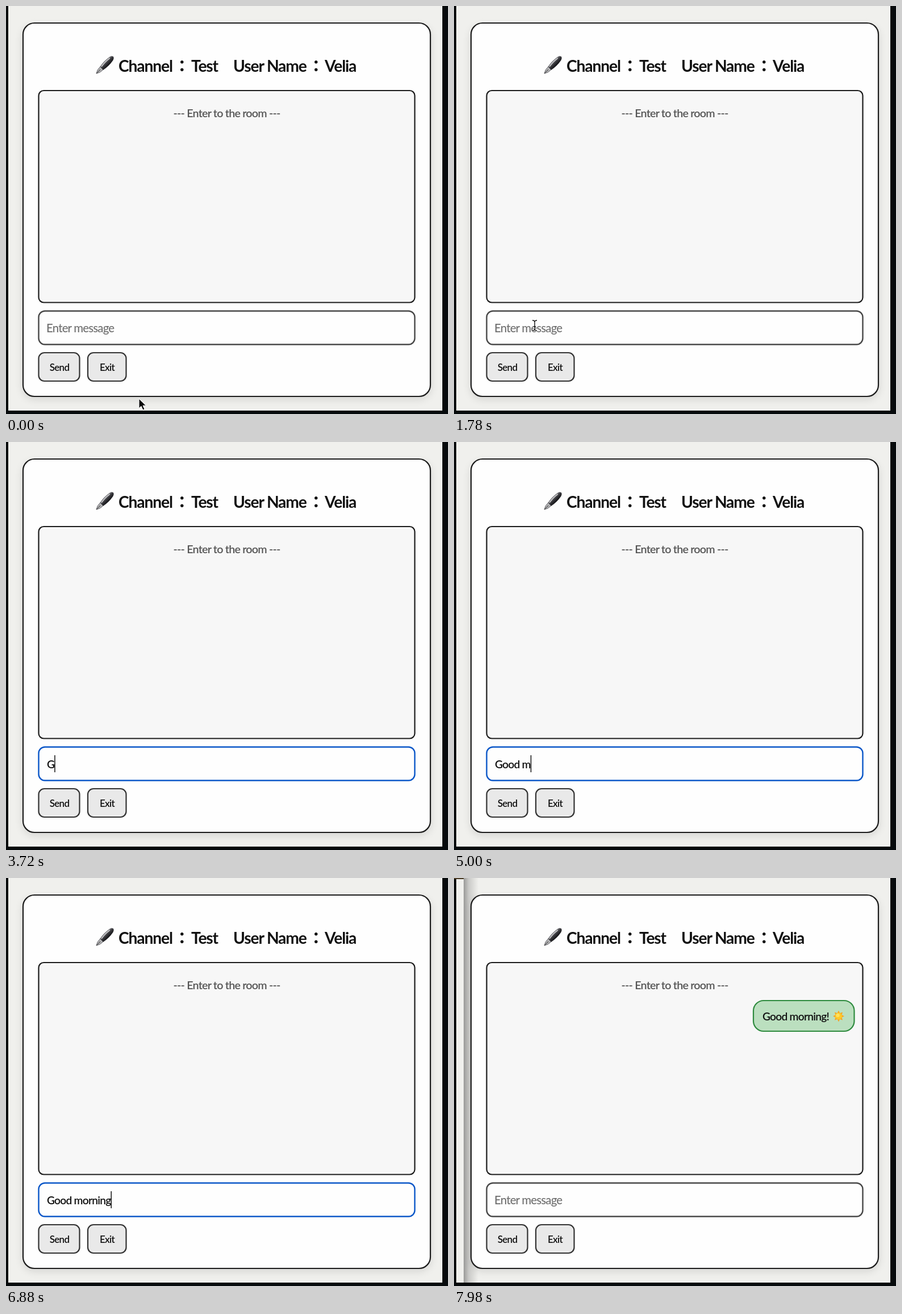
Recreate the animation shown at these times as an HTML page. Size 778 by 719 pixels, loop 8000 ms.

```html
<!DOCTYPE html>
<html lang="en">
<head>
<meta charset="utf-8">
<title>Chat room</title>
<style>
  html, body { margin: 0; width: 100%; height: 100%; overflow: hidden; background: #060a0c; }
  svg { display: block; width: 778px; height: 719px; }
  text { font: 600 19.2px Lato, "Open Sans", sans-serif; letter-spacing: -.04em; white-space: pre; fill: #111; }
  .title text { font-size: 28.2px; font-weight: 700; }
  .title .colon { font-size: 37px; text-anchor: middle; }
  .notice { font-size: 19.7px; text-anchor: middle; fill: #555; }
  .outline { stroke: #1c1c1c; stroke-width: 2.2; }
  .button rect { fill: #e9e9e9; stroke: #333; stroke-width: 2.2; }
  .button text { font-size: 17px; text-anchor: middle; }
</style>
</head>
<body>
<svg viewBox="0 0 778 719">
  <defs>
    <linearGradient id="edge">
      <stop offset="0" stop-color="#444" stop-opacity=".5"/>
      <stop offset=".35" stop-color="#444" stop-opacity=".22"/>
      <stop offset="1" stop-color="#444" stop-opacity="0"/>
    </linearGradient>
    <linearGradient id="barrel" x2="0" y2="1">
      <stop offset="0" stop-color="#8c8c90"/>
      <stop offset=".45" stop-color="#3a3a3e"/>
      <stop offset="1" stop-color="#111114"/>
    </linearGradient>
    <filter id="soft" x="-10%" y="-10%" width="120%" height="120%"><feGaussianBlur stdDeviation="8"/></filter>
    <g id="sun">
      <path id="rays" fill="#f5a524"/>
      <circle r="6" fill="#ffc928"/>
      <circle cx="-1.5" cy="-1.5" r="3.2" fill="#ffe15a"/>
    </g>
  </defs>

  <rect x="4" width="764" height="713" fill="#f0f0ed"/>
  <rect x="30" y="36" width="717" height="656" rx="20" opacity=".13" filter="url(#soft)"/>
  <g id="window" visibility="hidden">
    <rect x="17" width="26" height="713" fill="url(#edge)"/>
    <rect width="17" height="2" fill="#4a3b25"/>
  </g>

  <rect class="outline" x="30" y="30" width="717" height="658" rx="20" fill="#fefefe"/>

  <g class="title">
    <g transform="translate(159 119) rotate(-45)">
      <path d="M0 0Q5-4 14-3.8L14 3.8Q5 4 0 0Z" fill="#b4b4b6" stroke="#55555a" stroke-width=".8"/>
      <path d="M0 0H10" stroke="#444" stroke-width="1"/>
      <path d="M13-4Q25-6.5 37-4.3Q42-3 42 0Q42 3 37 4.3Q25 6.5 13 4Z" fill="url(#barrel)"/>
      <path d="M15-2.2Q25-4 36-2.5" fill="none" stroke="#d2d2d4" stroke-width="1.6"/>
    </g>
    <text x="198" y="116">Channel</text>
    <text x="309" y="115" class="colon">:</text>
    <text x="326" y="116">Test</text>
    <text x="400" y="116">User Name</text>
    <text x="545" y="115" class="colon">:</text>
    <text x="561" y="116">Velia</text>
  </g>

  <rect class="outline" x="57.5" y="149" width="662" height="373.5" rx="9" fill="#f7f7f7"/>
  <text x="388.5" y="196" class="notice">--- Enter to the room ---</text>

  <g id="bubble" visibility="hidden">
    <rect x="527" y="216" width="177.5" height="54" rx="18" fill="#bbdfbf" stroke="#2e8b3e" stroke-width="2.2"/>
    <text x="543" y="251">Good morning!</text>
    <use href="#sun" x="677" y="243.5"/>
  </g>

  <rect id="field" x="57.5" y="537.5" width="662" height="59" rx="11" fill="#fefefe" stroke-width="2.4"/>
  <text id="hint" x="71" y="575" style="font-size:20.4px;font-weight:500;fill:#707070">Enter message</text>
  <text id="typed" x="72" y="575"></text>
  <use id="typedSun" href="#sun" y="567" visibility="hidden"/>
  <rect id="caret" y="552" width="1.5" height="30" fill="#111"/>

  <g class="button">
    <rect x="57.5" y="611" width="72" height="50" rx="10"/>
    <text x="94" y="643">Send</text>
    <rect x="144" y="611" width="67.5" height="50" rx="10"/>
    <text x="178" y="643">Exit</text>
  </g>

  <path id="arrow" d="M0 0V17L4 13.3L7 20L10 18.7L7.1 12.2H12.5Z" fill="#0a0a0a" stroke="#fff" stroke-width="1"/>
  <g id="beam" fill="none">
    <path d="M-4-9Q0-9 0-6Q0-9 4-9M0-6V6M-4 9Q0 9 0 6Q0 9 4 9M-2 2H2" stroke="#fff" stroke-width="3"/>
    <path d="M-4-9Q0-9 0-6Q0-9 4-9M0-6V6M-4 9Q0 9 0 6Q0 9 4 9M-2 2H2" stroke="#111" stroke-width="1.4"/>
  </g>
</svg>
<script>
const LOOP = 8000, FOCUS = 2100, SEND = 7260, SWITCH = 7360;
const MESSAGE = "Good morning!";
const keyTimes = [3640, 3900, 4150, 4400, 4650, 4900, 5200, 5500, 5800, 6100, 6400, 6700, 7000];
const SUN_TIME = 7140;
const pointerPath = [[0, 234, 692], [420, 234, 692], [1140, 216, 626], [1760, 142, 563]];

const el = id => document.getElementById(id);
const show = (id, on) => el(id).setAttribute("visibility", on ? "visible" : "hidden");

el("rays").setAttribute("d", Array.from({ length: 16 }, (_, i) => {
  const angle = i * Math.PI / 8, r = i % 2 ? 6 : 10;
  return (i ? "L" : "M") + Math.cos(angle) * r + " " + Math.sin(angle) * r;
}).join("") + "Z");

function pointerAt(t) {
  const next = pointerPath.findIndex(([time]) => time > t);
  if (next < 0) return pointerPath.at(-1).slice(1);
  const [t0, x0, y0] = pointerPath[next - 1], [t1, x1, y1] = pointerPath[next];
  const k = (t - t0) / (t1 - t0), eased = k * k * (3 - 2 * k);
  return [x0 + (x1 - x0) * eased, y0 + (y1 - y0) * eased];
}

function draw(t) {
  const sent = t >= SEND, focused = t >= FOCUS && !sent;
  const count = sent ? 0 : keyTimes.filter(time => time <= t).length;
  const sun = t >= SUN_TIME && !sent;

  el("typed").textContent = MESSAGE.slice(0, count);
  const end = 72 + (count ? el("typed").getComputedTextLength() : 0);
  el("field").setAttribute("stroke", focused ? "#0b57c8" : "#484848");
  show("hint", !count);
  show("typedSun", sun);
  el("typedSun").setAttribute("x", end + 15);

  const lastKey = sun ? SUN_TIME : count ? keyTimes[count - 1] : FOCUS;
  el("caret").setAttribute("x", end + (sun ? 27 : 0));
  show("caret", focused && (t - lastKey) % 1060 < 530);

  const [x, y] = pointerAt(t), overField = y < 598, visible = t < keyTimes[0];
  for (const id of ["arrow", "beam"]) el(id).setAttribute("transform", `translate(${x} ${y})`);
  show("arrow", visible && !overField);
  show("beam", visible && overField);

  show("bubble", sent);
  show("window", t >= SWITCH);
}

function tick() {
  draw(performance.now() % LOOP);
  requestAnimationFrame(tick);
}
tick();
</script>
</body>
</html>
```
